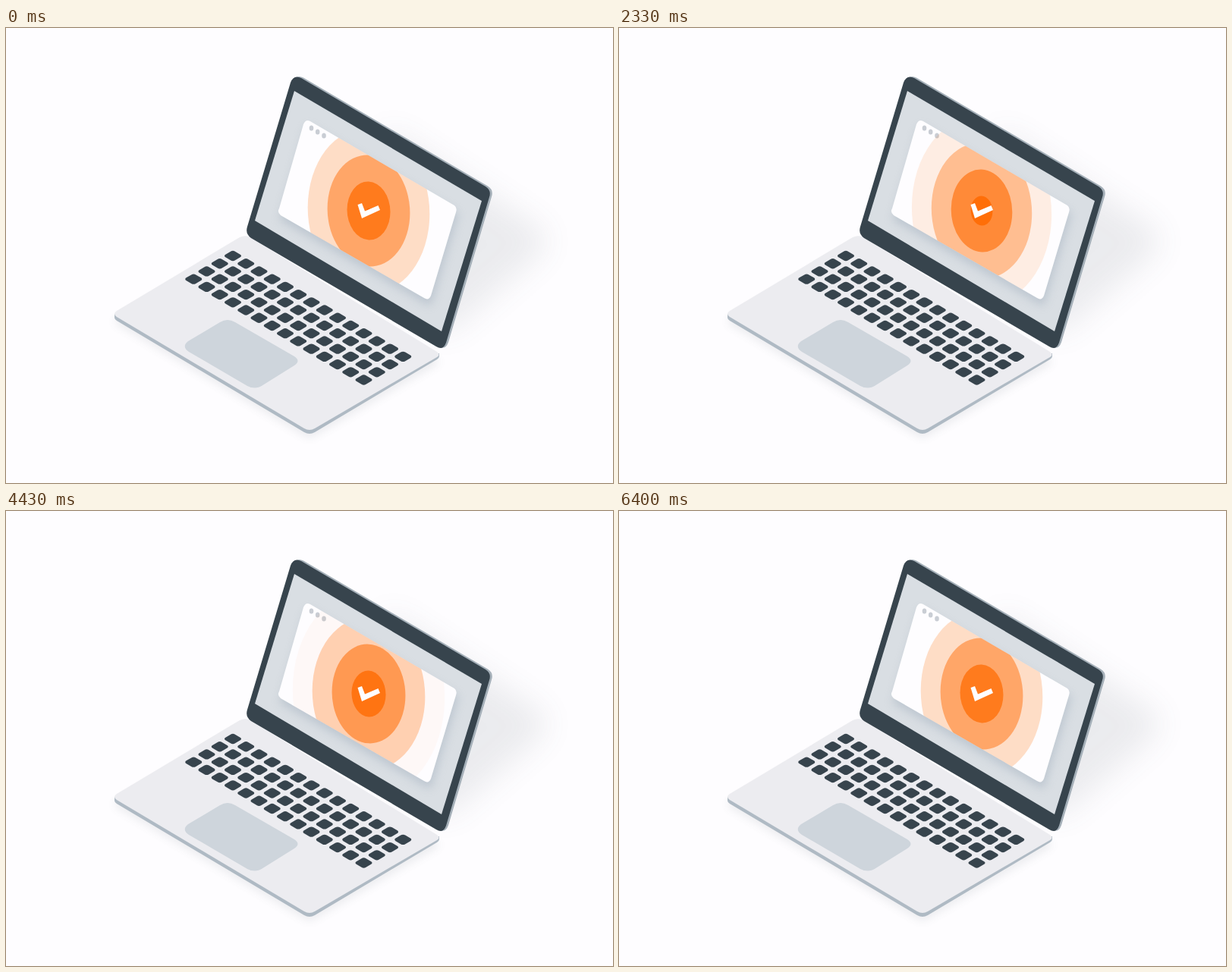
An HTML page that plays this animation: 800 by 600 pixels, repeating every 6430 ms.

```html
<!DOCTYPE html>
<html lang="en">
<head>
<meta charset="utf-8">
<title>Laptop pulse</title>
<style>
html, body { margin: 0; width: 100%; height: 100%; overflow: hidden; background: #fefdff; }
svg { display: block; width: 800px; height: 600px; }
</style>
</head>
<body>
<svg viewBox="0 0 800 600">
  <defs>
    <filter id="far" x="-50%" y="-50%" width="200%" height="200%"><feGaussianBlur stdDeviation="20"/></filter>
    <filter id="near" x="-20%" y="-20%" width="140%" height="140%"><feGaussianBlur stdDeviation="6"/></filter>
    <path id="lid" d="M375 72Q379 61 389 66L632 209Q640 214 637 223L580 415Q576 426 567 420L323 277Q315 271 318 262Z"/>
    <path id="screen" d="M380 83L627 228L574 400L328 254Z"/>
    <path id="card" d="M392 127Q395 119.500 401 123L591 234Q595 237 593 243L560 353Q557 360 551 356L362 247Q357 243 360 238Z"/>
    <path id="base" d="M308 276Q314 273 320 275L568 427Q573 431 568 434L407 528Q400 532 393 528L146 381Q140 377 146 373Z"/>
    <clipPath id="inScreen"><use href="#screen"/></clipPath>
    <clipPath id="inCard"><use href="#card"/></clipPath>
  </defs>

  <path d="M500 130L700 262Q722 279 704 297L580 405L500 350Z" fill="#55606b" opacity=".11" filter="url(#far)"/>
  <use href="#base" y="10" fill="#55606b" opacity=".1" filter="url(#near)"/>

  <path d="M143 377V382Q143 384 146 386L393 533Q400 537 407 533L568 437Q571 435 571 433V429L400 460Z" fill="#afbac4"/>
  <use href="#base" fill="#ececf0"/>
  <g id="keys" fill="#37444d" transform="matrix(.8625 .511 -.8625 .511 299 300.500)"></g>
  <path d="M240 413L282 388Q292 382 302 388L380 433Q389 439 380 445L340 470Q329 478 318 472L241 427Q231 420 240 413Z" fill="#ced5dc"/>

  <use href="#lid" x="3" y="-.5" fill="#a5b0b9"/>
  <use href="#lid" fill="#37444d"/>
  <use href="#screen" fill="#d9dee3"/>
  <g clip-path="url(#inScreen)">
    <use href="#card" x="2" y="8" fill="#a9b5c2" opacity=".55" filter="url(#near)"/>
  </g>
  <use href="#card" fill="#fefdff"/>
  <g fill="#c9cdd4">
    <ellipse cx="402.500" cy="132" rx="2.800" ry="3.600"/>
    <ellipse cx="410.700" cy="137" rx="2.800" ry="3.600"/>
    <ellipse cx="419" cy="142" rx="2.800" ry="3.600"/>
  </g>
  <g clip-path="url(#inCard)">
    <g id="rings" fill="#ff6a00" transform="translate(478 241) skewY(3)"></g>
  </g>
  <path d="M463.500 233L469 231L473 241.500L490.500 234L493 240L469 251Z" fill="#fefdff"/>
</svg>
<script>
const LOOP = 6430, PERIOD = 1600, COUNT = 4, SPACING = 25.9, START = 0.1;

function add(parent, tag, attrs) {
  const el = document.createElementNS('http://www.w3.org/2000/svg', tag);
  for (const name in attrs) el.setAttribute(name, attrs[name]);
  return document.getElementById(parent).appendChild(el);
}

// Keys sit on a square grid seen in isometric view.
for (let row = 0; row < 4; row++)
  for (let col = 0; col < 14; col++)
    add('keys', 'rect', { x: col * 20 - 7.4, y: row * 20 - 7.4, width: 14.8, height: 14.8, rx: 3.5 });

const rings = Array.from({ length: COUNT }, () => add('rings', 'ellipse', {}));

// Each ring grows steadily from the centre and fades out.
function draw(now) {
  const t = Math.min(now % LOOP, COUNT * PERIOD);
  rings.forEach((ring, i) => {
    const age = (t / PERIOD + START + i) % COUNT;
    ring.setAttribute('rx', age * SPACING);
    ring.setAttribute('ry', age * SPACING * 1.35);
    ring.setAttribute('opacity', 1 - age / COUNT);
  });
}

const begin = performance.now();
function tick() {
  draw(performance.now() - begin);
  requestAnimationFrame(tick);
}
tick();
</script>
</body>
</html>
```
